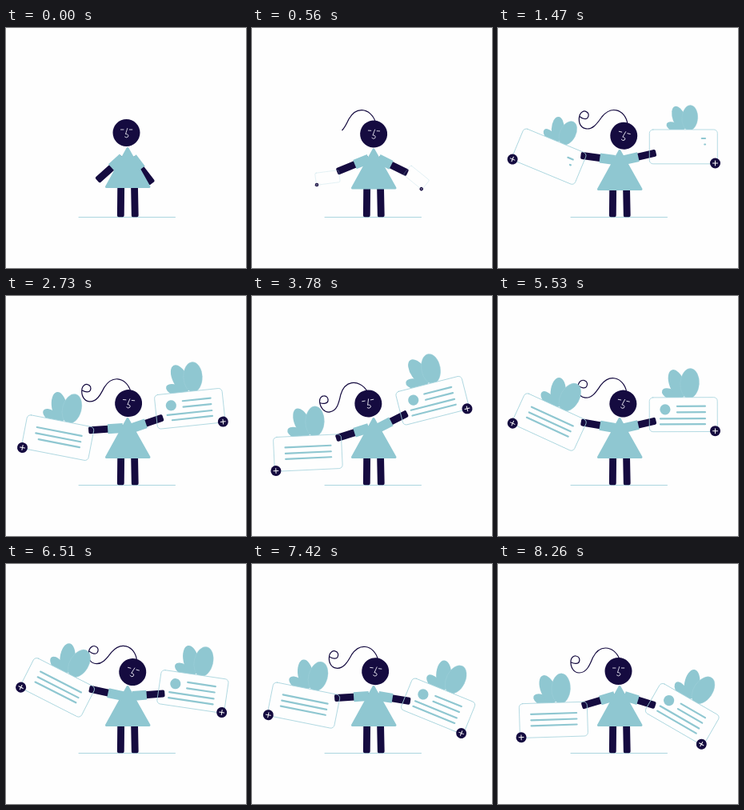
These frames come from a looping animation (300 by 300 pixels, 8890 ms). An HTML page with a canvas:

```html
<!DOCTYPE html>
<html lang="en">
<head>
<meta charset="utf-8">
<title>Juggling cards</title>
<style>
  html, body { margin: 0; width: 100%; height: 100%; overflow: hidden; background: #fefefe; }
  canvas { display: block; width: 300px; height: 300px; }
</style>
</head>
<body>
<canvas id="stage"></canvas>
<script>
const LOOP = 8890, STEP = 70, LAST = 8260;
const NAVY = '#150b40', TEAL = '#8fc7d1', EDGE = '#a3d2dc', PAPER = '#fefefe';
const canvas = document.getElementById('stage');
const ctx = canvas.getContext('2d');
const ratio = window.devicePixelRatio || 1;
canvas.width = canvas.height = 300 * ratio;

// Poses as [time, degrees]
const LEFT = [[140, -27], [1050, 20], [1470, 22.5], [2030, 19], [2730, 11], [3780, -2.7],
  [4620, 22], [5670, 25], [6650, 27], [7490, 10], [8260, -1.8]];
const RIGHT = [[140, 65], [1050, 3], [1470, 0], [1960, -1], [2730, -6], [3640, -15],
  [3780, -14.3], [4620, -0.8], [5670, 0], [6510, 8.4], [8260, 30]];
const TILT = [[140, 0], [1470, 13], [2730, 5], [3740, -10], [4620, 4], [6510, 15], [8260, 0]];

const HAIR = new Path2D('M1.5-15C-2-24-9-29-16-29C-25-29-29-23-32-17C-36-7-40 2-49 2' +
  'C-56 2-60-5-59.5-13C-59-17-56-19.5-53-19C-49-18.5-48-15-49-12C-50-9-55-9-59-11');
const HAIR_LENGTH = 150;
const FACE = new Path2D('M-7-4H-3.5M3.8-4H7.3M1.2-5.5L-1 1.5M-.6 1.5Q3.6 2 2 5Q0 7-2 5');
const DRESS = new Path2D('M152 153.5L179 201.5H125.5Z');

const clamp = v => Math.max(0, Math.min(1, v));
const ease = (t, from, to) => {
  const u = clamp((t - from) / (to - from));
  return u * u * (3 - 2 * u);
};

// Monotone cubic through the keys, flat at every extreme
function pose(keys, t) {
  const end = keys.length - 1;
  if (t <= keys[0][0]) return keys[0][1];
  if (t >= keys[end][0]) return keys[end][1];
  const slope = i => (keys[i + 1][1] - keys[i][1]) / (keys[i + 1][0] - keys[i][0]);
  const tangent = i => {
    if (i === 0 || i === end) return 0;
    const a = slope(i - 1), b = slope(i);
    return a * b > 0 ? 2 * a * b / (a + b) : 0;
  };
  const i = keys.findIndex(k => k[0] > t) - 1;
  const h = keys[i + 1][0] - keys[i][0], u = (t - keys[i][0]) / h, s = u * u * (3 - 2 * u);
  return keys[i][1] * (1 - s) + keys[i + 1][1] * s +
    h * u * (1 - u) * (tangent(i) * (1 - u) - tangent(i + 1) * u);
}

function group(x, y, degrees, scale, draw) {
  ctx.save();
  ctx.translate(x, y);
  ctx.rotate(degrees * Math.PI / 180);
  ctx.scale(scale, scale);
  draw();
  ctx.restore();
}

function line(x1, y1, x2, y2, width, color, cap = 'round') {
  ctx.beginPath();
  ctx.moveTo(x1, y1);
  ctx.lineTo(x2, y2);
  ctx.lineWidth = width;
  ctx.strokeStyle = color;
  ctx.lineCap = cap;
  ctx.stroke();
}

function oval(x, y, rx, ry, degrees, color) {
  ctx.beginPath();
  ctx.ellipse(x, y, rx, ry, degrees * Math.PI / 180, 0, 7);
  ctx.fillStyle = color;
  ctx.fill();
}

function limb(x1, y1, x2, y2, width) {
  group(x1, y1, Math.atan2(y2 - y1, x2 - x1) * 180 / Math.PI, 1, () => {
    ctx.beginPath();
    ctx.roundRect(0, -width / 2, Math.hypot(x2 - x1, y2 - y1), width, 2);
    ctx.fillStyle = NAVY;
    ctx.fill();
  });
}

function plant(x, size) {
  group(x, 0, 0, size, () => {
    oval(-24, -4, 6.5, 11.5, -65, TEAL);
    oval(-16, -17, 9.5, 18.5, -20, TEAL);
    oval(0, -17.5, 11.8, 18.8, 4, TEAL);
    ctx.lineWidth = 0.4;
    ctx.strokeStyle = EDGE;
    ctx.stroke();
  });
}

function cardOutline() {
  ctx.beginPath();
  ctx.roundRect(0, 0, 85, 42.8, 4.5);
}

function badge(x) {
  oval(x, 42, 6.5, 6.5, 0, NAVY);
  line(x - 3, 42, x + 3, 42, 1, PAPER);
  line(x, 39, x, 45, 1, PAPER);
}

// An arm and its card turn together around the shoulder.
function side(t, shoulder, angle, card, hand, rows, details) {
  const [x, y] = shoulder;
  const shown = ease(t, 280, 980);
  const inCard = draw => {
    if (shown > 0) group(hand[0], hand[1], 0, shown, () =>
      group(card.x - hand[0], card.y - hand[1], 0, 1, draw));
  };
  group(x, y, angle, 1, () => {
    inCard(() => {
      const size = 1 - (1 - clamp((t - 950) / 1000)) ** 2.5;
      if (size > 0) plant(card.plant, size);
      cardOutline();
      ctx.fillStyle = PAPER;
      ctx.fill();
      rows.forEach(([from, to, rowY], i) => {
        const p = ease(t, 1240 + 130 * i, 2300 + 700 * i / (rows.length - 1));
        if (p > 0) line(to - (to - from) * p, rowY, to, rowY, 2.2, TEAL);
      });
      details(t);
    });
    limb(0, 0, hand[0], hand[1], 9);
    inCard(() => {
      cardOutline();
      ctx.lineWidth = 0.8;
      ctx.strokeStyle = EDGE;
      ctx.stroke();
      badge(card.badge);
    });
    line(0, 0, hand[0] * 0.44, hand[1] * 0.44, 12, TEAL, 'butt');
  });
}

function head(t, lift) {
  const tilt = pose(TILT, t);
  const place = draw => group(150.5, 164 + lift, tilt, 1, () => group(0, -30, 0, 1, draw));
  return {
    hair: () => place(() => {
      const grown = ease(t, 200, 1120);
      if (!grown) return;
      ctx.setLineDash([HAIR_LENGTH * 1.2 * grown, 400]);
      ctx.lineWidth = 1.2;
      ctx.lineCap = 'round';
      ctx.strokeStyle = NAVY;
      ctx.stroke(HAIR);
    }),
    face: () => place(() => {
      oval(0, 0, 17, 17, 0, NAVY);
      ctx.lineWidth = 0.9;
      ctx.lineCap = ctx.lineJoin = 'round';
      ctx.strokeStyle = '#e4e2ee';
      ctx.stroke(FACE);
    })
  };
}

function render(t) {
  ctx.setTransform(ratio, 0, 0, ratio, 0, 0);
  ctx.fillStyle = PAPER;
  ctx.fillRect(0, 0, 300, 300);

  const lift = -3 * (1 - ease(t, 140, 1000));
  const { hair, face } = head(t, lift);
  hair();
  line(91, 236.5, 211.5, 236.5, 0.9, EDGE);
  limb(143.7, 197, 143.3, 236.3, 8.8);
  limb(160.5, 197, 161.3, 236.3, 8.8);

  side(t, [146, 165 + lift], pose(LEFT, t), { x: -120, y: 6, plant: 53, badge: 1.5 }, [-41.5, 11],
    [[14.5, 71.5, 13.5], [14.5, 71.5, 21], [14.5, 71.5, 28]], () => {});
  side(t, [158, 165 + lift], pose(RIGHT, t), { x: 31.3, y: -38, plant: 50.5, badge: 82.2 }, [39.5, -9],
    [[34.7, 69.7, 11], [34.7, 69.7, 18.5], [13.7, 69.7, 26.5], [13.7, 69.7, 33.5]], time => {
      const grown = ease(time, 1750, 2350);
      if (grown) oval(19.7, 15, 6.6 * grown, 6.6 * grown, 0, TEAL);
    });

  group(0, lift, 0, 1, () => {
    ctx.fillStyle = ctx.strokeStyle = TEAL;
    ctx.lineWidth = 3;
    ctx.lineJoin = 'round';
    ctx.fill(DRESS);
    ctx.stroke(DRESS);
  });
  face();
}

const start = performance.now();
function tick() {
  const t = (performance.now() - start) % LOOP;
  render(Math.min(LAST, Math.floor(t / STEP) * STEP));
  requestAnimationFrame(tick);
}
tick();
</script>
</body>
</html>
```
